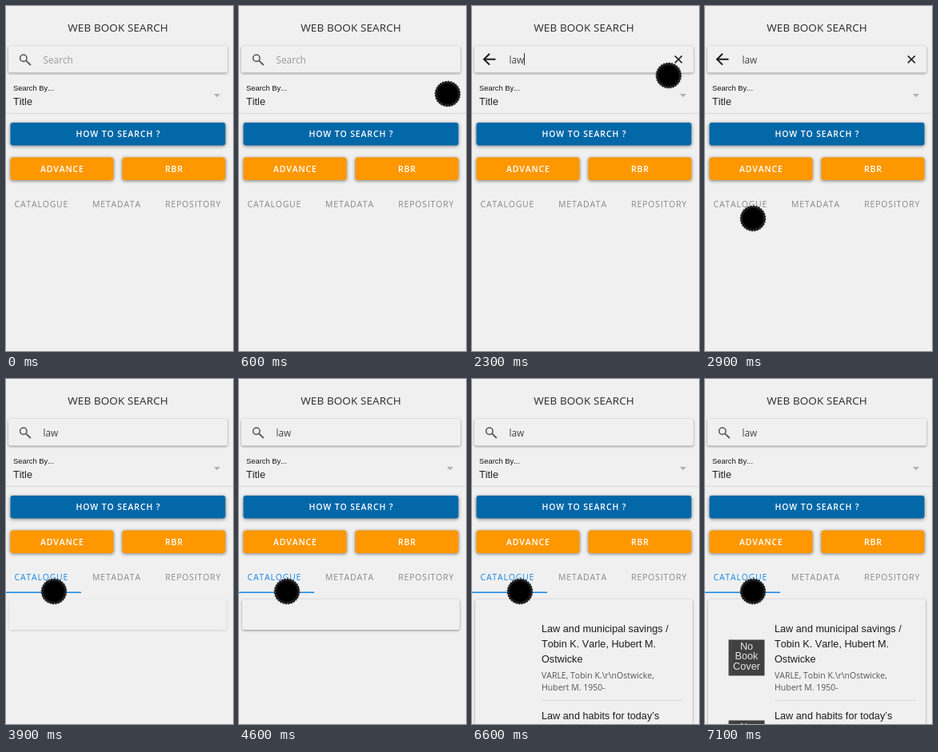
An HTML page with a canvas that plays this animation: 284 by 432 pixels, repeating every 7.2 s.

```html
<!DOCTYPE html>
<html lang="en">
<head>
<meta charset="utf-8">
<title>Library search</title>
<style>
  html, body { margin: 0; width: 100%; height: 100%; overflow: hidden; background: #f0f0f0; }
  canvas { display: block; width: 284px; height: 432px; }
</style>
</head>
<body>
<canvas id="stage" width="284" height="432"></canvas>
<script>
const ctx = document.getElementById('stage').getContext('2d');
const LOOP = 7200, STEP = 100;
const UI = '"Open Sans", "Noto Sans", sans-serif';
const ARIAL = '"Liberation Sans", Arial, sans-serif';
const BG = '#f0f0f0', BLUE = [20, 134, 232], GREY = [136, 136, 136];

const clamp = v => Math.max(0, Math.min(1, v));
const ease = v => v * v * (3 - 2 * v);
const mix = (a, b, k) => a + (b - a) * k;
const blend = (a, b, k) => `rgb(${a.map((v, i) => Math.round(mix(v, b[i], k)))})`;

function text(str, x, y, size, color, { font = UI, weight = 400, gap = 0, align = 'left' } = {}) {
  ctx.font = `${weight} ${size}px ${font}`;
  ctx.fontKerning = 'none';
  ctx.letterSpacing = gap + 'px';
  ctx.textAlign = align;
  ctx.fillStyle = color;
  ctx.fillText(str, align === 'center' ? x + gap / 2 : x, y);
}

function panel(x, y, w, h, r, color, shade, blur = 3) {
  ctx.save();
  ctx.shadowColor = `rgba(0,0,0,${shade})`;
  ctx.shadowBlur = blur;
  ctx.shadowOffsetY = 1;
  ctx.fillStyle = color;
  ctx.beginPath();
  ctx.roundRect(x, y, w, h, r);
  ctx.fill();
  ctx.restore();
}

function line(points, color, width) {
  ctx.strokeStyle = color;
  ctx.lineWidth = width;
  ctx.beginPath();
  points.forEach(([x, y]) => ctx.lineTo(x, y));
  ctx.stroke();
}

function ring(x, y, r, color, width, dash = []) {
  ctx.strokeStyle = color;
  ctx.lineWidth = width;
  ctx.setLineDash(dash);
  ctx.beginPath();
  ctx.arc(x, y, r, 0, Math.PI * 2);
  ctx.stroke();
  ctx.setLineDash([]);
}

function rect(x, y, w, h, color) {
  ctx.fillStyle = color;
  ctx.fillRect(x, y, w, h);
}

function disc(x, y, r, color) {
  ctx.fillStyle = color;
  ctx.beginPath();
  ctx.arc(x, y, r, 0, Math.PI * 2);
  ctx.fill();
}

function searchBar(t) {
  panel(3, 50, 274, 33.5, 2, BG, 0.42);
  const focused = t >= 900 && t < 3600;
  const value = 'law'.slice(0, [1600, 1800, 2100].filter(k => t >= k).length);

  if (focused) {
    line([[15, 66.7], [29.5, 66.7]], '#1c1c1c', 2);
    line([[22, 59.8], [15, 66.7], [22, 73.6]], '#1c1c1c', 2);
  } else {
    ring(21.8, 65.2, 4.2, '#585858', 1.6);
    line([[25, 68.4], [30.8, 74]], '#585858', 1.8);
  }

  if (value) text(value, 46.5, 71.5, 11.8, '#424242');
  else text('Search', 46.5, 71.5, 11.8, '#9a9a9a');

  if (focused && value) {
    line([[253.8, 62.3], [262.8, 71.3]], '#2a2a2a', 1.7);
    line([[262.8, 62.3], [253.8, 71.3]], '#2a2a2a', 1.7);
  }

  const typed = t >= 2100 ? 2100 : t >= 1600 ? t : 900;
  if (focused && Math.floor((t - typed) / 500) % 2 === 0) {
    rect([46, 50, 56, 65][value.length], 59, 1, 15, '#333');
  }
}

function form() {
  text('Search By...', 9, 106, 9.4, '#161616', { font: ARIAL });
  text('Title', 9, 124, 12.7, '#222', { font: ARIAL });
  ctx.fillStyle = '#b0b0b0';
  ctx.beginPath();
  ctx.moveTo(260, 110);
  ctx.lineTo(268, 110);
  ctx.lineTo(264, 114.2);
  ctx.fill();
  rect(0, 134, 284, 1, '#d6d6d6');

  const label = { weight: 600, gap: 0.85, align: 'center' };
  [['HOW TO SEARCH ?', 5.5, 146, 269, '#0368a8'],
   ['ADVANCE', 5.5, 189.5, 129, '#ff9800'],
   ['RBR', 145.5, 189.5, 129, '#ff9800']].forEach(([str, x, y, w, color]) => {
    panel(x, y, w, 28.5, 3, color, 0.5, 4);
    text(str, x + w / 2, y + 18.3, 10.5, '#fff', label);
  });
}

function tabs(t) {
  const k = ease(clamp((t - 3500) / 300));
  const gap = 0.8, idle = blend(GREY, GREY, 0);
  text('CATALOGUE', 10.5, 252, 10.5, blend(GREY, BLUE, k), { gap });
  text('METADATA', 108, 252, 10.5, idle, { gap });
  text('REPOSITORY', 199.3, 252, 10.5, idle, { gap });
  ctx.globalAlpha = k;
  rect(0, 266.5, 94, 1.5, blend(BLUE, BLUE, 0));
  ctx.globalAlpha = 1;
}

function cover(x, y) {
  rect(x, y, 45, 45, '#404040');
  rect(x + 3, y, 1, 45, '#515151');
  ['No', 'Book', 'Cover'].forEach((word, i) =>
    text(word, x + 22.5, y + 12 + i * 12.7, 12.7, '#e6e6e6', { font: ARIAL, align: 'center' }));
}

function results(t) {
  const shown = t >= 6600;
  const k = clamp((t - 3800) / 300);
  if (k > 0) panel(4, 276, 272, shown ? 170 : 38, 2, BG, 0.42 * k);
  if (!shown) return;

  ['Law and municipal savings /', 'Tobin K. Varle, Hubert M.', 'Ostwicke'].forEach((str, i) =>
    text(str, 87, 317 + i * 19, 12.7, '#1c1c1c', { font: ARIAL }));
  text('VARLE, Tobin K.\\r\\nOstwicke,', 87, 375, 10.5, '#555');
  text('Hubert M. 1950-', 87, 390, 10.5, '#555');
  rect(87, 402, 177, 1, '#d8d8d8');
  text('Law and habits for today\u2019s', 87, 426, 12.7, '#1c1c1c', { font: ARIAL });
  if (t >= 6800) {
    cover(29.5, 326.5);
    cover(29.5, 427.5);
  }
}

// Pointer stops: time, x, y
const stops = [[100, 301, 190], [600, 261, 110], [800, 243, 73], [2200, 243, 73],
  [2300, 246, 87], [2900, 60, 266], [LOOP, 60, 266]];

function pointer(t) {
  if (t < 100 || (t >= 1600 && t < 2300)) return;
  const i = stops.findIndex(s => s[0] > t);
  const [t0, x0, y0] = stops[i - 1], [t1, x1, y1] = stops[i];
  const k = ease((t - t0) / (t1 - t0));
  const x = mix(x0, x1, k), y = mix(y0, y1, k);
  disc(x, y, 15.6, '#202020');
  ring(x, y, 15.7, '#202020', 1.2, [2, 1.5]);
  disc(x, y, 13, '#000');
}

function draw(now) {
  const t = Math.floor((now % LOOP) / STEP) * STEP;
  rect(0, 0, 284, 432, BG);
  text('WEB BOOK SEARCH', 140, 32, 13.5, '#2a2a2a', { gap: 0.1, align: 'center' });
  searchBar(t);
  form();
  tabs(t);
  results(t);
  pointer(t);
}

let start;
function tick(now) {
  start ??= now;
  draw(now - start);
  requestAnimationFrame(tick);
}
draw(0);
requestAnimationFrame(tick);
</script>
</body>
</html>
```
